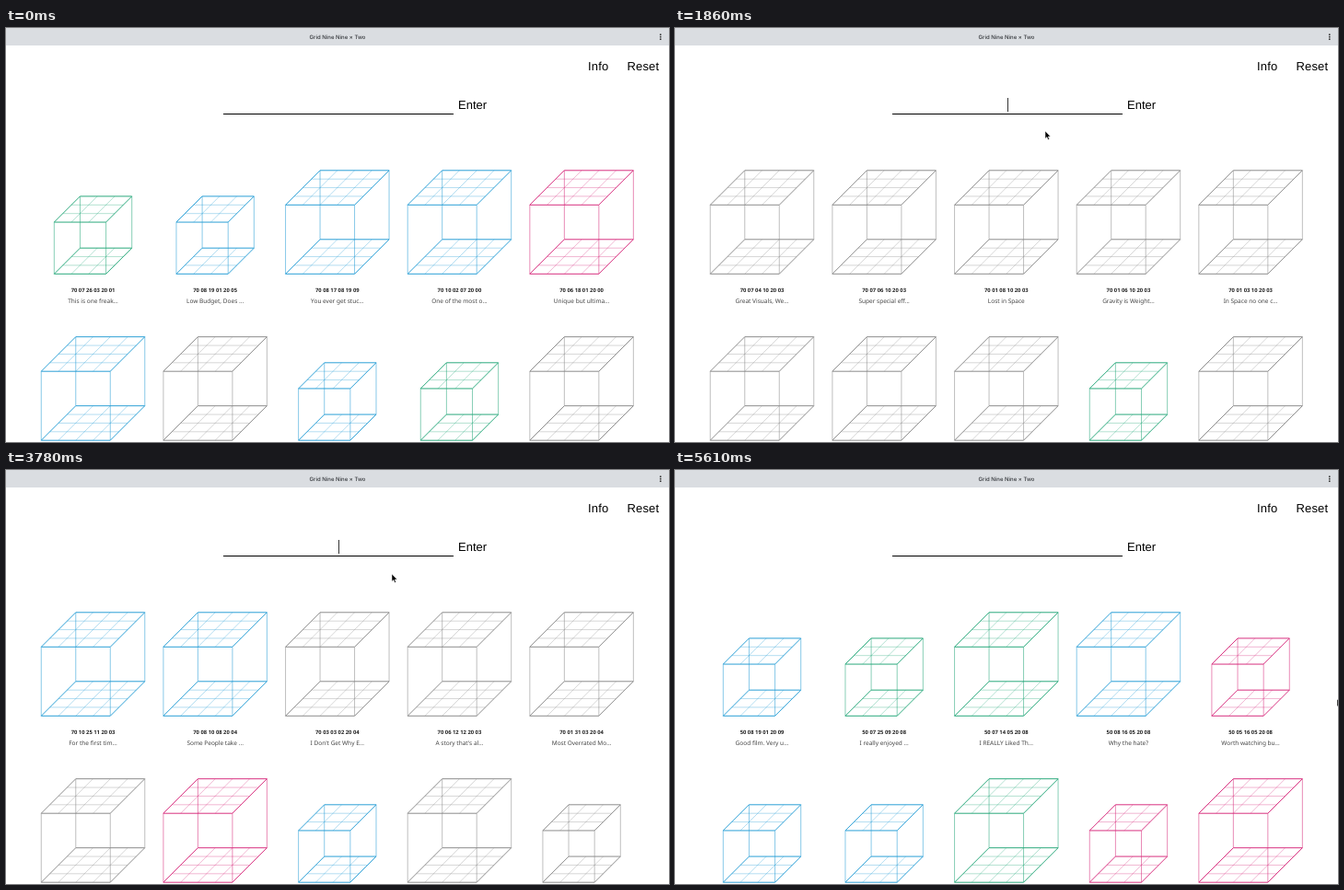
An HTML page for the animation above (5730 ms loop, 720 by 450 pixels).

```html
<!DOCTYPE html>
<html lang="en">
<head>
<meta charset="utf-8">
<title>Cube search</title>
<style>
  html, body { margin: 0; width: 100%; height: 100%; overflow: hidden; background: #fff; }
  svg { display: block; width: 100vw; height: 100vh; }
  text { text-rendering: geometricPrecision; }
  .ui { font: 13px "Liberation Sans", Arial, sans-serif; }
  .nav { letter-spacing: .2px; }
  .mid { text-anchor: middle; }
  .bar { font: 500 6px Inter, sans-serif; fill: #33363a; }
  .code { font: 600 5.85px "Noto Sans", sans-serif; fill: #222; }
  .note { font: 6.5px "Noto Sans", sans-serif; fill: #444; }
  .cube path { fill: none; }
  .face { stroke-width: 1; }
  .post { stroke-width: .7; opacity: .8; }
  .grid { stroke-width: .55; opacity: .65; }
</style>
</head>
<body>
<svg id="stage" viewBox="0 0 720 450">
  <rect width="720" height="19" fill="#dadde1"/>
  <text class="bar mid" x="360" y="11.6">Grid Nine Nine × Two</text>
  <g fill="#333">
    <circle cx="710.8" cy="7.2" r=".9"/><circle cx="710.8" cy="9.7" r=".9"/><circle cx="710.8" cy="12.2" r=".9"/>
  </g>
  <g class="ui">
    <text class="nav" x="632" y="46">Info</text>
    <text class="nav" x="674.4" y="46">Reset</text>
    <text x="491" y="88">Enter</text>
    <text id="query" class="mid" x="361" y="88"></text>
  </g>
  <rect x="236" y="93" width="250" height="1"/>
  <rect id="strike" x="491" y="83.5" width="31.5" height="1"/>
  <rect id="caret" y="76" width="1" height="15" fill="#333"/>
  <g id="results"></g>
  <path id="arrow" d="M0 0V8.2L1.9 6.5 3.1 9.4 4.5 8.8 3.3 6H5.8Z" stroke="#fff" stroke-width=".5"/>
  <path id="hand" fill="#fff" stroke="#000" stroke-width=".75" stroke-linejoin="round"
    d="M-.9.8Q0-.4.9.8V3.4L4.5 4.2Q5.6 4.8 5.2 6.6L4.2 9.6H-.4L-3 6.2Q-2.8 4.8-1.7 5.5L-.9 6.2ZM.9 6.4V8.2M2.3 6.4V8.2M3.6 6.4V8.2"/>
</svg>
<script>
const LOOP = 5730, TICK = 30;
const $ = id => document.getElementById(id);
const COLORS = { b: '#2a9fd6', g: '#2aa97c', p: '#d8307f', k: '#8c8c8c' };

// Capital letter: cube of four cells a side; small letter: three.
const PAGES = [
  { from: 0, cubes: 'gbBBPBKbgK', labels: [
    ['70 07 26 03 20 01', 'This is one freak...'], ['70 08 19 01 20 05', 'Low Budget, Does ...'],
    ['70 08 17 08 19 09', 'You ever get stuc...'], ['70 10 02 07 20 00', 'One of the most o...'],
    ['70 06 18 01 20 00', 'Unique but ultima...']] },
  { from: 1320, cubes: 'KKKKKKKKgK', labels: [
    ['70 07 04 10 20 03', 'Great Visuals, We...'], ['70 07 06 10 20 03', 'Super special eff...'],
    ['70 01 08 10 20 03', 'Lost in Space'], ['70 01 06 10 20 03', 'Gravity is Weight...'],
    ['70 01 03 10 20 03', 'In Space no one c...']] },
  { from: 3090, cubes: 'BBKKKKPbKk', labels: [
    ['70 10 25 11 20 03', 'For the first tim...'], ['70 08 10 08 20 04', 'Some People take ...'],
    ['70 03 03 02 20 04', "I Don't Get Why E..."], ['70 06 12 12 20 03', "A story that's al..."],
    ['70 01 31 03 20 04', 'Most Overrated Mo...']] },
  { from: 4980, cubes: 'bgGBpbbGpP', labels: [
    ['50 08 19 01 20 09', 'Good film. Very u...'], ['50 07 25 09 20 08', 'I really enjoyed ...'],
    ['50 07 14 05 20 08', 'I REALLY Liked Th...'], ['50 08 16 05 20 08', 'Why the hate?'],
    ['50 05 16 05 20 08', 'Worth watching bu...']] }
];

function cube(kind, cx, bottom) {
  const cells = kind < 'a' ? 4 : 3, cell = 18.75;
  const side = cells * cell, depth = side / 2;
  const left = cx - (side + depth) / 2, right = left + side;
  let grid = '', faces = '';
  for (const y of [bottom, bottom - side]) {
    faces += `M${left} ${y}l${depth} ${-depth}h${side}l${-depth} ${depth}z`;
    for (let i = 1; i < cells; i++) {
      const d = i * cell / 2;
      grid += `M${left + d} ${y - d}h${side}M${left + i * cell} ${y}l${depth} ${-depth}`;
    }
  }
  const post = (x, y) => `M${x} ${y}v${-side}`;
  const posts = post(left, bottom) + post(right, bottom) +
    post(left + depth, bottom - depth) + post(right + depth, bottom - depth);
  return `<g class="cube" stroke="${COLORS[kind.toLowerCase()]}"><path class="grid" d="${grid}"/>` +
    `<path class="post" d="${posts}"/><path class="face" d="${faces}"/></g>`;
}

const column = i => 94.5 + 132.65 * (i % 5);
$('results').innerHTML = PAGES.map(page => '<g>' +
  [...page.cubes].map((kind, i) => cube(kind, column(i), i < 5 ? 267.3 : 448.2)).join('') +
  page.labels.map(([code, note], i) =>
    `<text class="code mid" x="${column(i)}" y="287">${code}</text>` +
    `<text class="note mid" x="${column(i)}" y="299.2">${note}</text>`).join('') + '</g>').join('');
const pageNodes = [...$('results').children];

// Each entry: start time, typed text, caret visible.
const INPUT = [[0, '', false], [60, '', true]];
function type(word, times, blurAt, clearAt) {
  times.forEach((t, i) => INPUT.push([t, word.slice(0, i + 1), true]));
  INPUT.push([blurAt, word, false], [clearAt, '', false]);
}
type('gravity', [120, 210, 270, 420, 480, 570, 630], 780, 1320);
INPUT.push([1740, '', true]);
type('frozen', [2040, 2130, 2220, 2340, 2520, 2610], 2730, 3090);
INPUT.push([3630, '', true]);
type('terminal', [3990, 4080, 4170, 4290, 4440, 4590, 4620, 4680], 4770, 4980);

// Pointer trips as [time, x, y]; the pointer is hidden between trips.
const TRIPS = [
  [[780, 359, 114], [960, 505.5, 85.5], [1320, 505.5, 85.5], [1500, 503, 113], [1680, 503, 113],
   [1860, 402, 112], [1950, 390, 113], [2040, 390, 113]],
  [[2730, 390, 113], [2970, 511, 107], [3030, 509, 86], [3120, 509, 86], [3240, 522, 119],
   [3570, 522, 119], [3780, 419, 113], [3990, 419, 113]],
  [[4740, 419, 113], [4890, 507, 86], [4980, 507, 86], [5160, 719, 249], [LOOP, 719, 249]]
];

function pointerAt(t) {
  const trip = TRIPS.find(p => t >= p[0][0] && t < p[p.length - 1][0]);
  if (!trip) return null;
  const i = trip.findIndex(p => t < p[0]);
  const [t0, x0, y0] = trip[i - 1], [t1, x1, y1] = trip[i];
  const u = (t - t0) / (t1 - t0), k = u * u * (3 - 2 * u);
  return [x0 + (x1 - x0) * k, y0 + (y1 - y0) * k];
}

const show = (node, on) => node.setAttribute('visibility', on ? 'visible' : 'hidden');

function draw(t) {
  const page = PAGES.filter(p => p.from <= t).length - 1;
  pageNodes.forEach((node, i) => show(node, i === page));

  const [, text, caret] = INPUT.filter(e => e[0] <= t).pop();
  const query = $('query');
  if (query.textContent !== text) query.textContent = text;
  const width = text ? query.getComputedTextLength() : 0;
  $('caret').setAttribute('x', Math.round(361 + width / 2));
  show($('caret'), caret);

  const at = pointerAt(t);
  const over = !!at && at[0] > 491 && at[0] < 523 && at[1] > 76 && at[1] < 93;
  show($('strike'), over);
  show($('hand'), over);
  show($('arrow'), at && !over);
  if (at) for (const id of ['hand', 'arrow']) $(id).setAttribute('transform', `translate(${at})`);
}

const start = performance.now();
function frame() {
  const t = (performance.now() - start) % LOOP;
  draw(Math.floor(t / TICK) * TICK);
  requestAnimationFrame(frame);
}
frame();
</script>
</body>
</html>
```
